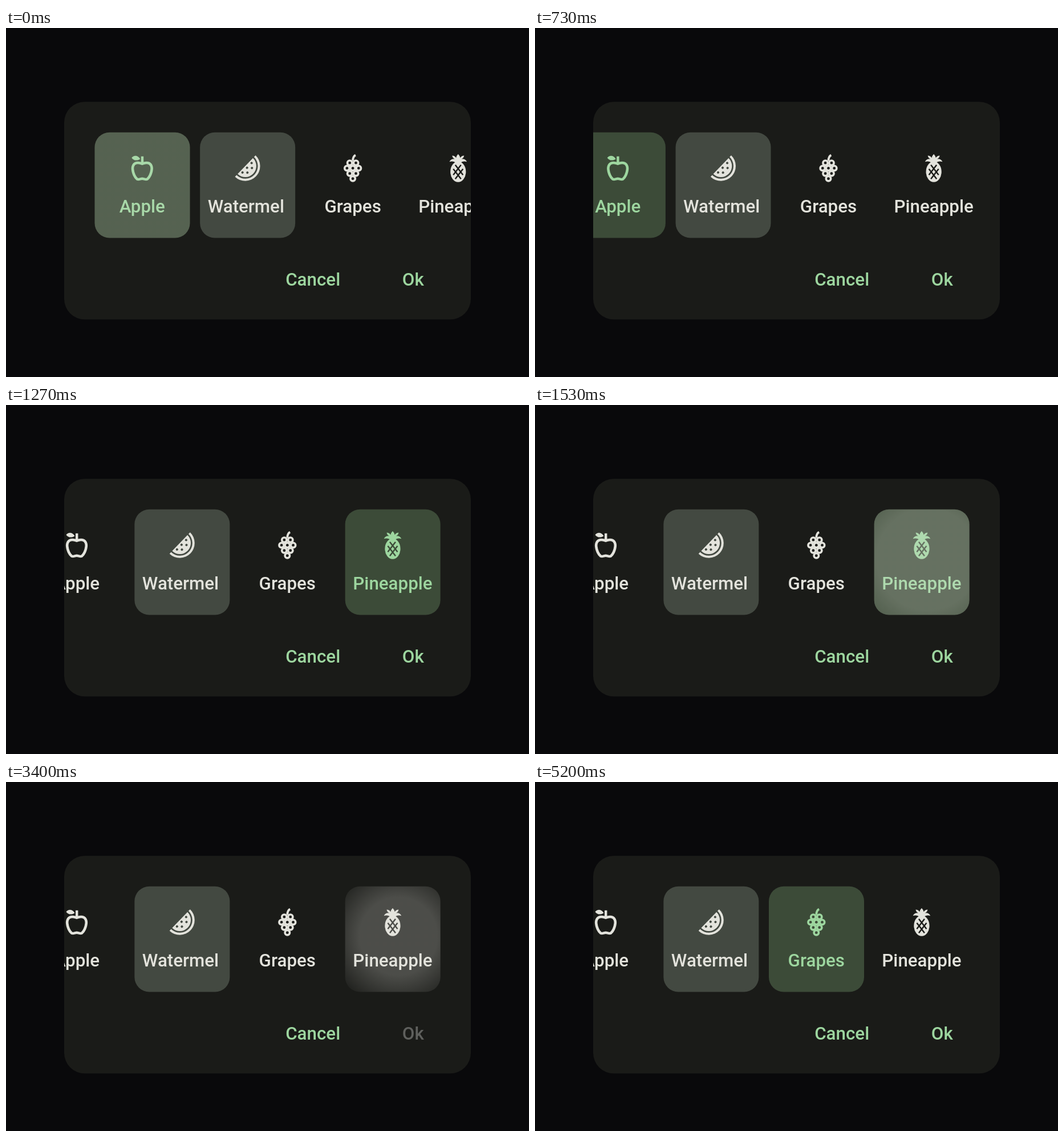
Write an HTML page that moves like this. It is 917x611 px and loops after 5270 ms.

```html
<!DOCTYPE html>
<html lang="en">
<head>
<meta charset="utf-8">
<title>Fruit picker</title>
<style>
  html, body { margin: 0; width: 100%; height: 100%; overflow: hidden; background: #09090b; }
  svg { display: block; width: 100%; height: 100%; }
  text { font: 500 31.3px Roboto, sans-serif; }
  .btn { fill: #9dd69f; }
</style>
</head>
<body>
<svg viewBox="0 0 917 611">
  <defs>
    <clipPath id="view"><rect x="102" y="129" width="713" height="381"/></clipPath>
    <radialGradient id="wave" gradientUnits="userSpaceOnUse" cx="10" cy="270" r="100">
      <stop offset=".5" stop-color="#e3e3dc"/>
      <stop offset="1" stop-color="#e3e3dc" stop-opacity="0"/>
    </radialGradient>
    <mask id="lattice" maskUnits="userSpaceOnUse" x="-20" y="-30" width="40" height="60">
      <rect x="-20" y="-30" width="40" height="60" fill="#fff"/>
      <path d="M-5 -6L8.5 11.5M-8.5 1L5 18.5M5 -6L-8.5 11.5M8.5 1L-5 18.5" stroke="#000" stroke-width="2.4"/>
    </mask>
  </defs>
  <rect width="917" height="611" fill="#09090b"/>
  <rect x="102" y="129.3" width="713" height="381" rx="36" fill="#1a1b18"/>
  <g clip-path="url(#view)"><g id="row"></g></g>
  <text class="btn" x="490.2" y="451">Cancel</text>
  <text class="btn" id="ok" x="694.8" y="451">Ok</text>
</svg>
<script>
const LOOP = 5270, STEP = 200 / 3, PITCH = 184.65;
const LIGHT = '#e3e3dc', GREEN = '#9dd69f', GREY = '#5f605d';
const CARD_ON = '#3c4b38', CARD_FOCUS = '#434941';

const leaf = `<path fill="currentColor" d="M-18.5 -18.5C-15 -23 -8 -23.5 -3.5 -16.5C-8 -13 -15 -13 -18.5 -18.5ZM-2 -21H2.4V-9H-2Z"/>`;
const apple = leaf + `<path fill="none" stroke="currentColor" stroke-width="4.6" stroke-linejoin="round"
  d="M0 -8C-4 -9.8 -7 -10 -10 -9.5C-16 -8.5 -17.2 -2 -16.7 2C-16 9 -12.5 16 -9 18.8C-6 20.5 -3 18 0 18
  C3 18 6 20.5 9 18.8C12.5 16 16 9 16.7 2C17.2 -2 16 -8.5 10 -9.5C7 -10 4 -9.8 0 -8Z"/>`;

const hole = ([x, y]) => `M${x - 2} ${y}a2 2 0 1 0 4 0a2 2 0 1 0 -4 0Z`;
const seeds = [[-11.5, 4.3], [0, 4.3], [11.5, 4.3], [-5.7, 10.7], [5.7, 10.7]].map(hole).join('');
const melon = `<path transform="translate(-3.9 -4) rotate(-46)" fill="currentColor" fill-rule="evenodd"
  d="M-26 0A26 26 0 0 0 26 0H22A22 22 0 0 1 -22 0ZM-19.3 0A19.3 19.3 0 0 0 19.3 0Z${seeds}"/>`;

const berries = [[-5.4, -9.5], [5.4, -9.5], [-10.2, -.3], [0, -.3], [10.2, -.3], [-5.4, 9], [5.4, 9], [0, 18]];
const grapes = `<g fill="none" stroke="currentColor" stroke-width="3.6">` +
  berries.map(([x, y]) => `<circle cx="${x}" cy="${y}" r="4.2"/>`).join('') +
  `<path stroke-width="3.8" d="M0 -13C0 -18.5 1.5 -21.5 4.8 -23.2"/></g>`;

const pineapple = `<g fill="currentColor"><ellipse cy="6" rx="13.6" ry="18" mask="url(#lattice)"/>
  <path d="M0 -25Q3.5 -21.5 3.6 -18.5Q6 -22.5 10.5 -22.3Q9.8 -18.5 6 -16.2Q12.5 -17.2 15.3 -11.5Q9 -13.2 5 -10.5H-5
  Q-9 -13.2 -15.3 -11.5Q-12.5 -17.2 -6 -16.2Q-9.8 -18.5 -10.5 -22.3Q-6 -22.5 -3.6 -18.5Q-3.5 -21.5 0 -25Z"/></g>`;

const fruits = [['Apple', apple], ['Watermel', melon], ['Grapes', grapes], ['Pineapple', pineapple]];
const row = document.getElementById('row');
const ok = document.getElementById('ok');
const wave = document.getElementById('wave');

row.innerHTML = fruits.map(([name, icon], i) => {
  const card = 'x="-83.5" y="182.7" width="167" height="184.8" rx="26"';
  const place = i === 1 ? 'x="-70"' : 'x="-.2" text-anchor="middle"';
  return `<g class="item" transform="translate(${239 + i * PITCH} 0)">
    <rect class="card" ${card}/>
    <g transform="translate(-.2 245.7)">${icon}</g>
    <text ${place} y="323" fill="currentColor">${name}</text>
    <rect class="ripple" ${card} fill="url(#wave)"/></g>`;
}).join('');

const items = [...row.children].map(el => ({
  el, card: el.querySelector('.card'), ripple: el.querySelector('.ripple')
}));

// Each tap changes the selection at once and starts a ripple on its card.
const taps = [
  { at: -537, item: 0, pick: 0 },
  { at: 1266, item: 3, pick: 3 },
  { at: 3200, item: 3, pick: -1 },
  { at: 4333, item: 2, pick: 2 }
];

const clamp = x => Math.max(0, Math.min(1, x));

function scrollAt(t) {
  if (t > 1260) return 114.8;
  return 115.4 * Math.sin(clamp((t - 431) / 502) * Math.PI / 2);
}

function draw(t) {
  const tap = taps.filter(p => p.at <= t + 1).pop();
  const age = t - tap.at;
  const alpha = .25 * clamp(age / 70) * clamp((870 - age) / 550);

  row.setAttribute('transform', `translate(${-scrollAt(t)} 0)`);
  wave.setAttribute('r', 10 + .63 * Math.min(age, 450));
  items.forEach(({ el, card, ripple }, i) => {
    const on = i === tap.pick;
    el.setAttribute('color', on ? GREEN : LIGHT);
    card.setAttribute('fill', on ? CARD_ON : i === 1 ? CARD_FOCUS : 'none');
    ripple.setAttribute('opacity', i === tap.item ? alpha : 0);
  });
  ok.style.fill = tap.pick < 0 ? GREY : GREEN;
}

const start = performance.now();
function tick() {
  const ms = (performance.now() - start) % LOOP;
  draw(Math.floor((ms + 4) / STEP) * STEP);
  requestAnimationFrame(tick);
}
tick();
</script>
</body>
</html>
```
